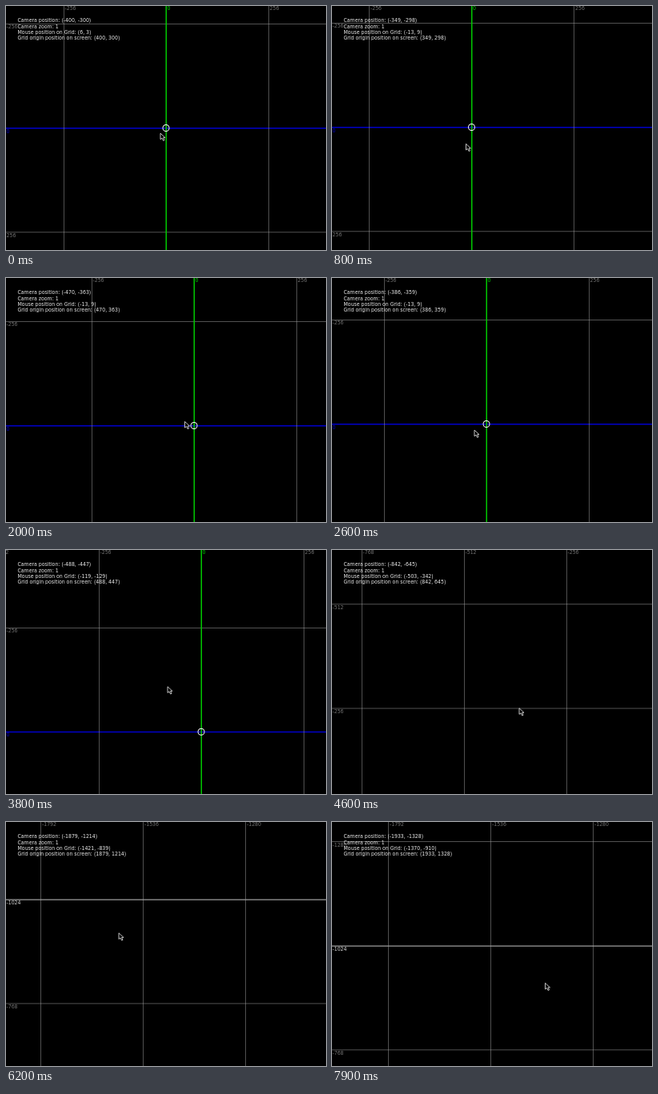
Write an HTML page with a canvas that moves like this. It is 400 px wide and 305 px high and loops after 8 s.

```html
<!DOCTYPE html>
<html lang="en">
<head>
<meta charset="utf-8">
<title>Grid camera</title>
<style>
html, body { margin: 0; width: 100%; height: 100%; overflow: hidden; background: #000; }
canvas { display: block; }
</style>
</head>
<body>
<canvas id="stage" width="400" height="305"></canvas>
<script>
const ctx = document.getElementById('stage').getContext('2d');
const W = 800, H = 600, CELL = 256, STEP = 100, LOOP = 8000;

// Mouse path on screen: step, x, y
const path = [
  [0, 406, 303], [1, 386, 313], [3, 387, 309], [7, 337, 274],
  [11, 332, 404], [14, 404, 463], [15, 418, 464], [18, 477, 409],
  [22, 437, 334], [26, 373, 368], [27, 356, 374], [29, 250, 236],
  [33, 226, 201], [38, 369, 318], [39, 404, 336], [41, 581, 441],
  [44, 197, 228], [46, 339, 303], [48, 597, 475], [50, 150, 227],
  [53, 610, 410], [55, 139, 161], [59, 579, 421], [62, 458, 375],
  [63, 282, 273], [65, 299, 321], [68, 350, 250], [73, 350, 250],
  [77, 595, 440], [79, 563, 418], [80, 533, 396]
];

// Steps during which the grid is held and follows the mouse
const drags = [[3, 27], [29, 41], [44, 48], [50, 53], [55, 65], [73, 80]];

function mouseAt(step) {
  const i = Math.max(1, path.findIndex(k => k[0] >= step));
  const [s, x, y] = path[i - 1], [s2, x2, y2] = path[i];
  const p = (step - s) / (s2 - s);
  return [Math.round(x + (x2 - x) * p), Math.round(y + (y2 - y) * p)];
}

function originAt(step) {
  const origin = [W / 2, H / 2];
  for (const [from, to] of drags) {
    if (step <= from) break;
    const a = mouseAt(from), b = mouseAt(Math.min(step, to));
    origin[0] += b[0] - a[0];
    origin[1] += b[1] - a[1];
  }
  return origin;
}

function text(s, x, y, color) {
  ctx.fillStyle = color;
  ctx.fillText(s, x, y);
}

function gridLines(origin, size, vertical) {
  const axis = vertical ? '#00c800' : '#0000c8';
  const first = Math.floor(-origin / CELL) - 1;
  for (let n = first; n * CELL + origin < size; n++) {
    const pos = n * CELL + origin, major = n % 4 === 0;
    const width = n === 0 ? 3 : major ? 2 : 1;
    const start = n === 0 ? pos - 1 : pos;
    ctx.fillStyle = n === 0 ? axis : major ? '#c0c0c0' : '#a0a0a0';
    if (vertical) ctx.fillRect(start, 0, width, H);
    else ctx.fillRect(0, start, W, width);
    const color = n === 0 ? axis : major ? '#d0d0d0' : '#707070';
    text(n * CELL, vertical ? pos + 3 : 1, vertical ? 10 : pos + 12, color);
  }
}

const arrow = new Path2D('M0 0V15L4 12L7 18L10 17L7 11H12Z');

function drawCursor(x, y) {
  ctx.save();
  ctx.translate(x, y);
  ctx.fillStyle = '#000';
  ctx.strokeStyle = '#eee';
  ctx.lineWidth = 1.6;
  ctx.fill(arrow);
  ctx.stroke(arrow);
  ctx.restore();
}

function draw(step) {
  const [ox, oy] = originAt(step), [mx, my] = mouseAt(step);
  ctx.setTransform(400 / W, 0, 0, 305 / H, 0, 0);
  ctx.fillStyle = '#000';
  ctx.fillRect(0, 0, W, H);
  ctx.font = '12.4px "DejaVu Sans", sans-serif';

  gridLines(oy, H, false);
  gridLines(ox, W, true);

  ctx.beginPath();
  ctx.arc(ox, oy, 8, 0, Math.PI * 2);
  ctx.strokeStyle = '#fff';
  ctx.lineWidth = 2;
  ctx.stroke();

  [
    `Camera position: (${-ox}, ${-oy})`,
    'Camera zoom: 1',
    `Mouse position on Grid: (${mx - ox}, ${my - oy})`,
    `Grid origin position on screen: (${ox}, ${oy})`
  ].forEach((line, i) => text(line, 29, 40 + i * 14.2, '#e8e8e8'));

  drawCursor(...mouseAt(step + 1)); // the pointer runs one step ahead of the view
}

const begin = performance.now();
function tick() {
  const t = Math.max(0, performance.now() - begin) % LOOP;
  draw(Math.floor(t / STEP));
  requestAnimationFrame(tick);
}
tick();
</script>
</body>
</html>
```
